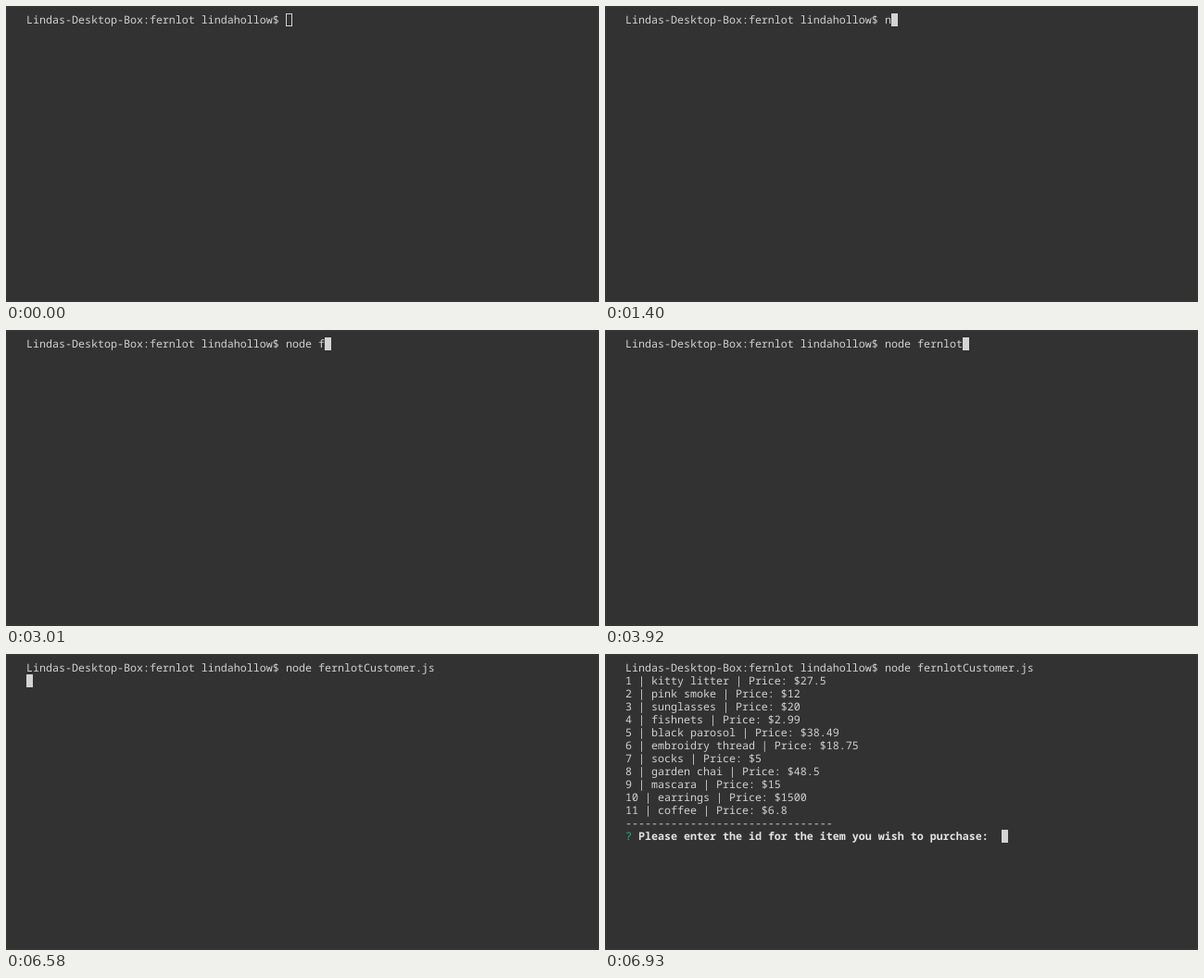
An HTML page that plays this animation: 640 px wide and 320 px high, repeating every 8000 ms.

```html
<!DOCTYPE html>
<html lang="en">
<head>
<meta charset="utf-8">
<title>Terminal session</title>
<style>
  html, body {
    margin: 0;
    width: 100%;
    height: 100%;
    overflow: hidden;
    background: #323232;
  }
  body::after {
    content: "";
    position: fixed;
    inset: 0;
    box-shadow: inset 0 0 3px #404040;
  }
  svg { display: block; }
  text {
    font: 11.667px "Noto Sans Mono", "DejaVu Sans Mono", monospace;
    font-variant-ligatures: none;
    text-rendering: geometricPrecision;
    fill: #d2d2d2;
  }
  .mark { fill: #2fae86; }
  .ask { font-weight: 700; fill: #e4e4e4; }
  .cover { fill: #323232; }
  .caret { stroke: #d4d4d4; fill: #d4d4d4; }

  .typed, .jump, .output, .caret {
    animation: 8s step-end infinite;
  }
  .typed { animation-name: type; }
  .jump { animation-name: jump; }
  .output { animation-name: show; }
  .caret { animation-name: focus; }

  /* one character is 7px wide; larger steps are tab completions */
  @keyframes type {
    0% { transform: translateX(0); }
    17.5% { transform: translateX(7px); }
    19.25% { transform: translateX(14px); }
    21.875% { transform: translateX(21px); }
    24.5% { transform: translateX(28px); }
    28.875% { transform: translateX(35px); }
    37.625% { transform: translateX(42px); }
    41.125% { transform: translateX(49px); }
    43.75% { transform: translateX(56px); }
    49% { transform: translateX(84px); }
    63.875% { transform: translateX(91px); }
    68.25%, 100% { transform: translateX(168px); }
  }
  /* enter, then the question below the list */
  @keyframes jump {
    0% { transform: translate(0, 0); }
    82.25% { transform: translate(-448px, 14px); }
    85.75%, 100% { transform: translate(-42px, 182px); }
  }
  @keyframes show {
    0% { visibility: hidden; }
    85.75%, 100% { visibility: visible; }
  }
  @keyframes focus {
    0% { fill: #323232; }
    7%, 100% { fill: #d4d4d4; }
  }
</style>
</head>
<body>
<svg width="640" height="320" viewBox="0 0 640 320">
  <text x="22" y="19">Lindas-Desktop-Box:fernlot lindahollow$</text>
  <text x="302" y="19">node fernlotCustomer.js</text>
  <rect class="cover typed" x="302" y="7" width="180" height="16"/>

  <g class="output">
    <text y="19">
      <tspan x="22" dy="14">1 | kitty litter | Price: $27.5</tspan>
      <tspan x="22" dy="14">2 | pink smoke | Price: $12</tspan>
      <tspan x="22" dy="14">3 | sunglasses | Price: $20</tspan>
      <tspan x="22" dy="14">4 | fishnets | Price: $2.99</tspan>
      <tspan x="22" dy="14">5 | black parosol | Price: $38.49</tspan>
      <tspan x="22" dy="14">6 | embroidry thread | Price: $18.75</tspan>
      <tspan x="22" dy="14">7 | socks | Price: $5</tspan>
      <tspan x="22" dy="14">8 | garden chai | Price: $48.5</tspan>
      <tspan x="22" dy="14">9 | mascara | Price: $15</tspan>
      <tspan x="22" dy="14">10 | earrings | Price: $1500</tspan>
      <tspan x="22" dy="14">11 | coffee | Price: $6.8</tspan>
      <tspan x="22" dy="14">--------------------------------</tspan>
    </text>
    <text class="mark" x="22" y="201">?</text>
    <text class="ask" x="36" y="201">Please enter the id for the item you wish to purchase:</text>
  </g>

  <g class="jump">
    <g class="typed">
      <rect class="caret" x="302.5" y="8.5" width="6" height="13"/>
    </g>
  </g>
</svg>
</body>
</html>
```
